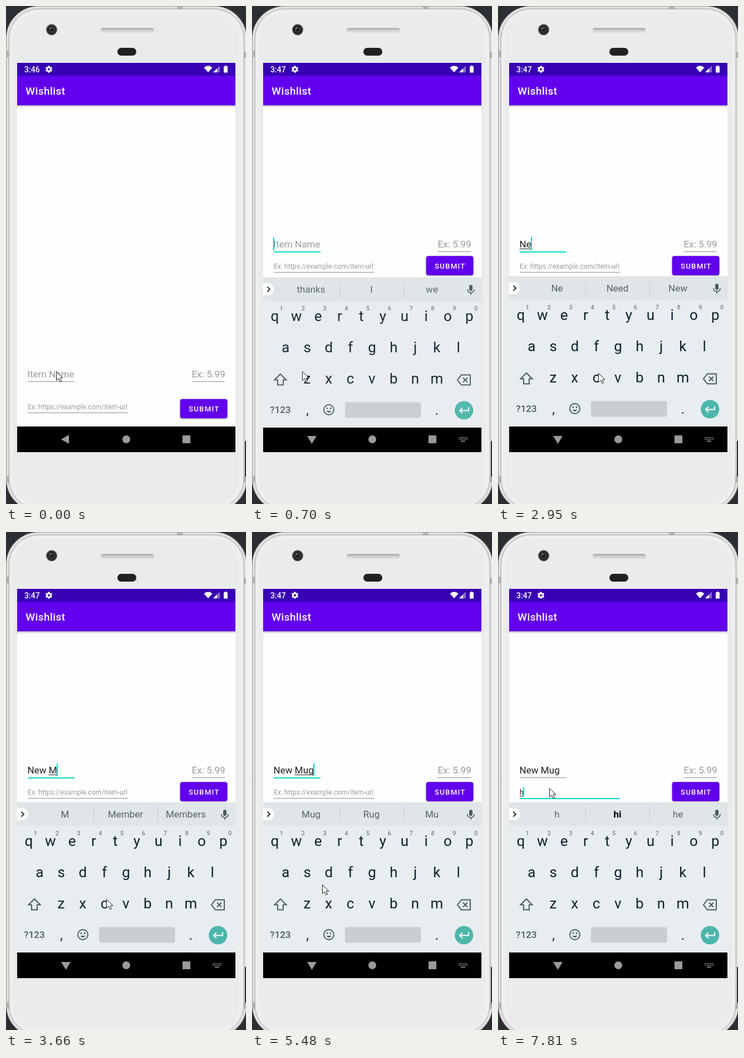
Animation of 431 by 893 pixels, one loop 8 s. Source, as an HTML page with a canvas:

```html
<!DOCTYPE html>
<html lang="en">
<head>
<meta charset="utf-8">
<title>Wishlist</title>
<style>
html, body { margin: 0; width: 100%; height: 100%; overflow: hidden; background: #2c2f31; }
canvas { display: block; }
</style>
</head>
<body>
<canvas id="stage" width="431" height="893"></canvas>
<script>
const c = document.getElementById('stage').getContext('2d');
const LOOP = 8000, TEAL = '#03dac5', ICON = '#4b5a61';

// Each step changes part of the state at its time in ms.
const steps = [
  [0, { clock: '3:46', mouse: [90.5, 655.5], focus: '', nameLit: 0, urlLit: 0, up: false,
        keys: 0, caret: false, name: '', url: '', words: ['thanks', 'I', 'we'], strong: false }],
  [300, { clock: '3:47', focus: 'name', nameLit: 0.5 }],
  [430, { nameLit: 1, caret: true }],
  [570, { up: true }],
  [700, { keys: 0.95 }],
  [840, { keys: 1 }],
  [970, { caret: false, mouse: [111.5, 655.5] }],
  [1110, { mouse: [180.5, 658.5] }],
  [1520, { caret: true }],
  [1950, { caret: false }],
  [2510, { caret: true }],
  [2660, { name: 'N', words: ['N', 'No', 'Not'] }],
  [2950, { name: 'Ne', words: ['Ne', 'Need', 'New'] }],
  [3090, { name: 'New', words: ['New', 'News', 'Now'] }],
  [3220, { name: 'New ', words: ['year', 'one', 'and'] }],
  [3660, { name: 'New M', words: ['M', 'Member', 'Members'] }],
  [3800, { name: 'New Mu', words: ['Mu', 'Must', 'My'] }],
  [4080, { name: 'New Mug', words: ['Mug', 'Rug', 'Mu'] }],
  [4640, { caret: false }],
  [5070, { caret: true }],
  [5480, { mouse: [126.5, 632.5] }],
  [5620, { mouse: [112.5, 585.5], caret: false }],
  [5750, { mouse: [96.5, 528.5] }],
  [5900, { mouse: [93.5, 469.5] }],
  [6040, { mouse: [92.5, 459.5], caret: true }],
  [6170, { urlLit: 0.6 }],
  [6320, { focus: 'url', nameLit: 0, urlLit: 1, words: ['thanks', 'I', 'we'] }],
  [6850, { caret: false }],
  [7380, { caret: true }],
  [7810, { url: 'h', words: ['h', 'hi', 'he'], strong: true }]
];

function stateAt(t) {
  return Object.assign({}, ...steps.filter(s => s[0] <= t).map(s => s[1]));
}

function text(s, x, y, size, color, { weight = 400, align = 'left', spacing = 0 } = {}) {
  c.font = `${weight} ${size}px Roboto, sans-serif`;
  c.textAlign = align;
  c.letterSpacing = spacing + 'px';
  c.fillStyle = color;
  c.fillText(s, x, y);
}

function rect(x, y, w, h, color) {
  c.fillStyle = color;
  c.fillRect(x, y, w, h);
}

function round(x, y, w, h, r, fill, stroke, width = 1) {
  c.beginPath();
  c.roundRect(x, y, w, h, r);
  paint(fill, stroke, width);
}

function disc(x, y, r, fill, stroke, width) {
  c.beginPath();
  c.arc(x, y, r, 0, 7);
  paint(fill, stroke, width);
}

function path(d, x, y, fill, stroke, width) {
  c.save();
  c.translate(x, y);
  paint(fill, stroke, width, new Path2D(d));
  c.restore();
}

function paint(fill, stroke, width = 1, p) {
  c.fillStyle = fill || 'transparent';
  c.strokeStyle = stroke || 'transparent';
  c.lineWidth = width;
  if (p) { c.fill(p); c.stroke(p); } else { c.fill(); c.stroke(); }
}

function fade(x0, y0, x1, y1, ...colors) {
  const g = c.createLinearGradient(x0, y0, x1, y1);
  colors.forEach((k, i) => g.addColorStop(i / (colors.length - 1), k));
  return g;
}

function shadow(color, blur, dy) {
  c.shadowColor = color;
  c.shadowBlur = blur;
  c.shadowOffsetY = dy;
}

function phone() {
  rect(0, 0, 431, 893, '#2c2f31');
  round(0.5, 0.5, 431.5, 905.5, 58, '#f3f0f1', '#8b8587', 1.2);
  round(3.5, 3.5, 425.5, 899.5, 55, null, '#bdb7b9', 1);
  round(5.5, 5.5, 421.5, 895.5, 53, '#eeeeef', '#a9a4a6', 1);
  round(13, 12, 406, 883, 47, '#e9ebec');
  for (const [x, y, w, h] of [[0, 80, 6, 12], [0, 843, 6, 12], [427, 82, 4, 11], [426, 844, 5, 11], [307, 0, 10, 5]])
    rect(x, y, w, h, '#b4afb1');
  rect(429, 780, 2, 64, '#25282a');

  disc(82, 42.5, 10, '#4b4b4b');
  disc(82, 42.5, 8, '#262626');
  disc(82, 42.5, 5, '#3f4140');
  disc(82, 42.5, 3, '#16191a');
  disc(80, 40, 1.3, '#8d9a72');
  round(170, 39.5, 95.5, 8.5, 4, fade(0, 39, 0, 48, '#969698', '#cfd0d1', '#dddedf'));
  round(200, 75, 34, 14, 7, '#202123');
}

function statusBar(clock) {
  rect(20, 102, 392, 23, '#3700b3');
  text(clock, 33, 119, 14, '#fff', { weight: 500 });
  disc(77, 113.5, 3.4, null, '#fff', 2.8);
  for (let i = 0; i < 6; i++) {
    c.save();
    c.translate(77, 113.5);
    c.rotate(i * Math.PI / 3 + Math.PI / 6);
    rect(3.5, -1.5, 2.7, 3, '#fff');
    c.restore();
  }
  path('M0 3Q7.5-3.5 15 3L7.5 11.5Z', 355.5, 107.5, '#fff');
  path('M12 0V12H0Z', 372, 107, '#8769d0');
  path('M7 5V12H0Z', 372, 107, '#fff');
  round(391, 108, 7, 11.5, 1, '#fff');
  rect(393, 106.8, 3, 2, '#fff');
}

function appBar() {
  rect(20, 125, 392, 53, '#6200ee');
  rect(20, 178, 392, 5, fade(0, 178, 0, 183, '#b0b0b0', '#e6e6e6', '#fefefe'));
  text('Wishlist', 35.3, 159, 19.06, '#fff', { weight: 500, spacing: 0.4 });
}

function underline(x, y, w, lit) {
  rect(x, y, w, 1, '#8c8c8c');
  c.globalAlpha = lit;
  rect(x, y, w, 2, TEAL);
  c.globalAlpha = 1;
}

// A text field: hint or value, composing underline and caret.
function field(value, hint, x, base, size, w, lineY, lit, focused, caret) {
  text(value || hint, x, base, size, value ? '#1f1f1f' : '#9b9b9b');
  underline(Math.round(x), lineY, w, lit);
  if (!focused) return;
  const end = x + c.measureText(value).width;
  const start = x + c.measureText(value.slice(0, value.lastIndexOf(' ') + 1)).width;
  rect(start, base + 2, end - start, 1, '#1f1f1f');
  if (caret) rect(Math.floor(end), base - Math.round(size * 1.06), 2, Math.round(size * 1.36), TEAL);
}

function form(s) {
  const nameY = s.up ? 433 : 666, urlY = s.up ? 471 : 723, btnY = s.up ? 448 : 704.5;
  field(s.name, 'Item Name', 38.5, nameY, 17.1, 84, nameY + 7, s.nameLit, s.focus === 'name', s.caret);
  field('', 'Ex: 5.99', 333.6, nameY, 17.1, 59, nameY + 7, 0);
  field(s.url, 'Ex: https://example.com/item-url', 39, urlY, 12.25, 180, urlY + 6, s.urlLit, s.focus === 'url', s.caret);
  shadow('rgba(0,0,0,.4)', 2.5, 1.2);
  round(312.7, btnY + 0.3, 84.8, 34.4, 4, '#6200ee');
  shadow('transparent', 0, 0);
  text('SUBMIT', 328, Math.floor(btnY + 23), 13.3, '#fff', { weight: 500, spacing: 1.19 });
}

function suggestions(s) {
  rect(20, 485, 392, 42, '#e0e5e8');
  rect(20, 484, 392, 1, '#eef0f1');
  round(20, 495, 19.5, 22, [0, 11, 11, 0], '#fff');
  path('M0 0L4.5 4.5L0 9', 27.5, 501.5, null, '#263238', 2);
  for (const x of [157, 272]) rect(x, 494, 1, 24, '#c3c9cc');
  s.words.forEach((w, i) => {
    const bold = s.strong && i === 1;
    text(w, 106 + 108.5 * i, 512, 17, bold ? '#000' : '#566269', { weight: bold ? 700 : 400, align: 'center' });
  });
  round(390, 498, 6, 11, 3, ICON);
  path('M0 0Q0 6 6 6T12 0M6 6V10', 387, 506, null, ICON, 1.6);
}

function keyboard(s) {
  const step = 38.8, ink = '#0f2029', mid = { align: 'center' };
  c.save();
  c.beginPath();
  c.rect(20, 484, 392, 272);
  c.clip();
  c.globalAlpha = s.keys;
  c.translate(0, s.keys < 1 ? 2 : 0);
  rect(20, 485, 392, 270, '#e8edf0');
  suggestions(s);
  [['qwertyuiop', 41], ['asdfghjkl', 60.3], ['zxcvbnm', 99]].forEach(([row, x], r) =>
    [...row].forEach((k, i) => text(k, x + i * step, 563 + r * 56, 26, ink, mid)));
  [...'1234567890'].forEach((k, i) => text(k, 53 + i * step, 544, 11, '#788389', { weight: 500, align: 'center' }));

  path('M0 10.5L10.5 0L21 10.5H15.5V19.5H5.5V10.5Z', 40.5, 658, null, ICON, 2);
  path('M7 0H23V18H7L0 9ZM10 5L18 13M18 5L10 13', 369, 659.5, null, ICON, 2);
  text('?123', 51, 728, 17, ICON, { weight: 500, align: 'center' });
  text(',', 99.5, 731, 24, ink, mid);
  text('.', 332, 731, 24, ink, mid);
  disc(138, 722, 9, null, ICON, 1.9);
  for (const x of [135, 141]) disc(x, 719.5, 1.4, ICON);
  path('M0 0Q4.5 6.5 9 0Z', 133.5, 724, ICON);
  round(167, 708.5, 136.5, 28, 3, '#c9ced1');
  disc(380.7, 723, 16.6, '#4db6ac');
  path('M17 1V7H1M6 2L1 7L6 12', 372, 716.5, null, '#fff', 2);
  c.restore();
}

function navBar(s) {
  const top = s.keys > 0 && s.keys < 1 ? 756 : 754, gray = '#9b9b9b';
  rect(20, top, 392, 800 - top, '#000');
  if (s.up) path('M0 0H17L8.5 14Z', 99, 771, gray);
  else path('M0 8L14 0V16Z', 99, 769, gray);
  disc(216, 777, 7, gray);
  rect(317, 770, 14, 14, gray);
  if (!s.up) return;
  for (let i = 0; i < 10; i++) rect(371.5 + i % 5 * 3.3, 773 + (i > 4) * 3, 1.8, 1.8, gray);
  rect(375, 779.5, 8, 1.6, gray);
}

function draw(t) {
  const s = stateAt(t);
  phone();
  rect(20, 102, 392, 698, '#fefefe');
  statusBar(s.clock);
  appBar();
  form(s);
  if (s.keys) keyboard(s);
  navBar(s);
  path('M0 0V16L3.8 12.6L6.4 18.2L9 17.1L6.5 11.5H11.5Z', ...s.mouse, '#fff', '#1a1a1a', 1);
}

const begin = performance.now();
function frame() {
  draw((performance.now() - begin) % LOOP);
  requestAnimationFrame(frame);
}
frame();
</script>
</body>
</html>
```
